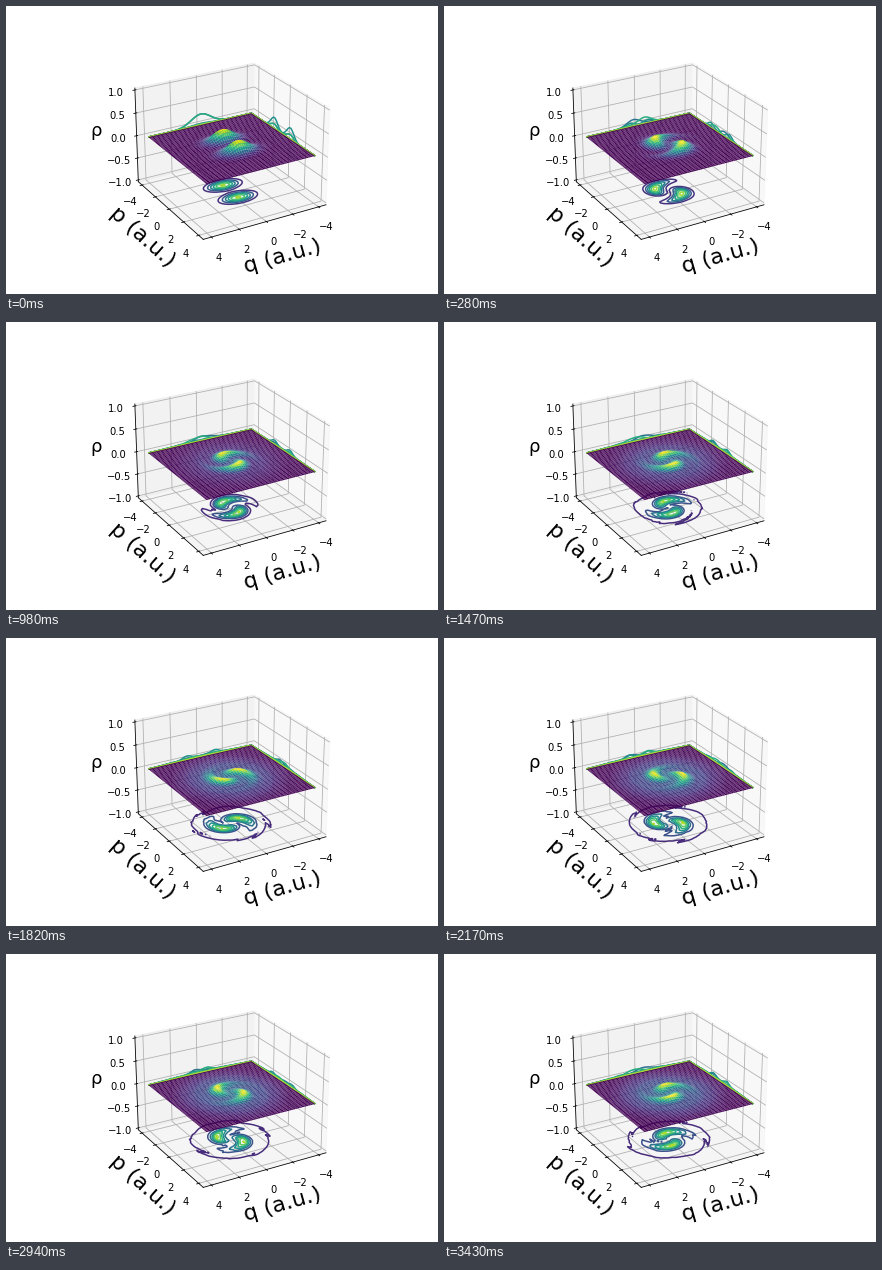
Recreate the animation shown at these times as a matplotlib script. Size 432 by 288 pixels, loop 3.5 s.

```python
import numpy as np
import matplotlib.pyplot as plt
from matplotlib.animation import FuncAnimation

FRAMES, INTERVAL = 50, 70
EDGE = 4.0
PAD = 25 / 24  # panes reach a little past the axis limits

plt.rcParams["font.family"] = "DejaVu Sans"

axis = np.linspace(-EDGE, EDGE, 50)
Q, P = np.meshgrid(axis, axis)
R, PHI = np.hypot(Q, P), np.arctan2(P, Q)

# accumulated clockwise rotation of the two packets, in degrees
TURN_AT = [0, 4, 14, 21, 31, 42, 49]
TURN = [0, 320, 1073, 1629, 2457, 3379, 3974]

rng = np.random.default_rng(4)
RIPPLES = [(m, rng.uniform(1, 4), rng.uniform(0, 2 * np.pi)) for m in (2, 5, 8, 12)]


def ease(k, start, end, tau):
    return end + (start - end) * np.exp(-k / tau)


def density(k):
    """Two packets that rotate, shear into arms and leak into a broad disc."""
    turn = np.radians(np.interp(k, TURN_AT, TURN))
    phi = PHI + turn + ease(k, 0, 1.3, 4) * (R - 0.9)
    u, v = R * np.cos(phi), R * np.sin(phi)
    centre = ease(k, 1.0, 0.92, 5)
    su, sv = ease(k, 0.75, 0.5, 15), ease(k, 0.425, 0.4, 5)
    packets = sum(
        np.exp(-0.5 * (u / su) ** 2 - 0.5 * ((v - side * centre) / sv) ** 2)
        for side in (-1, 1)
    )
    ripple = 1 + 0.07 * sum(np.cos(m * phi + a * R + b) for m, a, b in RIPPLES)
    disc = 0.026 * (1 - np.exp(-((k / 18) ** 2))) * np.exp(-((R / 3.1) ** 4))
    return ease(k, 0.25, 0.085, 5) * packets + disc * ripple


fig = plt.figure(figsize=(6, 4), dpi=72, facecolor="white")
fig.subplots_adjust(left=0.125, right=0.9, bottom=0.125, top=0.88)
ax = fig.add_subplot(projection="3d")
ax.view_init(elev=25, azim=60)
ax.set_xlim(-4.4 * PAD, 4.4 * PAD)
ax.set_ylim(-4.4 * PAD, 4.4 * PAD)
ax.set_zlim(-PAD, PAD)
ax.set_xticks([-4, -2, 0, 2, 4])
ax.set_yticks([-4, -2, 0, 2, 4])
ax.set_zticks([-1, -0.5, 0, 0.5, 1])
ax.set_xlabel("q (a.u.)", fontsize=22)
ax.set_ylabel("p (a.u.)", fontsize=22)
ax.set_zlabel("ρ", fontsize=18)

artists = []


def draw(k):
    while artists:
        artists.pop().remove()
    rho = density(k)
    artists.append(ax.plot_surface(Q, P, rho, cmap="viridis"))
    for zdir, offset in (("z", -1), ("x", -EDGE), ("y", -EDGE)):
        artists.append(
            ax.contour(Q, P, rho, zdir=zdir, offset=offset, cmap="viridis")
        )
    return artists


anim = FuncAnimation(
    fig, draw, frames=FRAMES, interval=INTERVAL, repeat=True, blit=False
)
plt.show()
```
